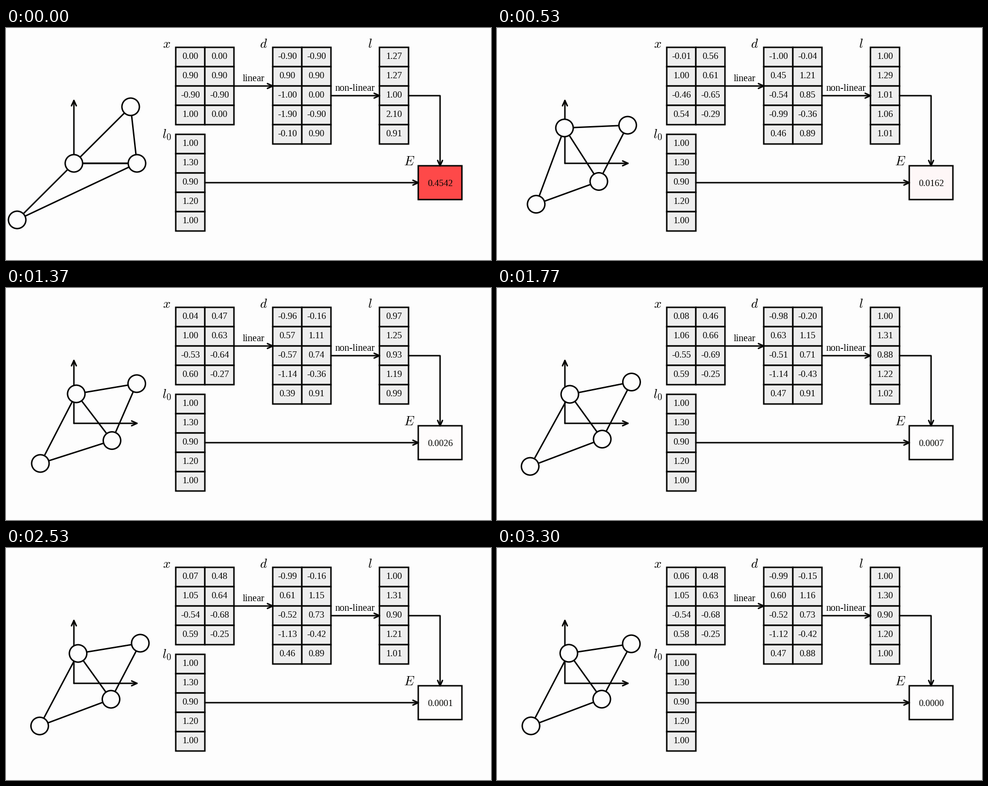
Recreate the animation shown at these times as a matplotlib script. Size 1000 by 480 pixels, loop 3330 ms.

```python
from itertools import product

import matplotlib.pyplot as plt
import numpy as np
from matplotlib.animation import FuncAnimation
from matplotlib.patches import Circle, Rectangle

STEPS, LOOP_MS = 100, 3330
FRAMES = 2 * STEPS  # two frames per step
PAPER, INK, CELL = "#fdfdfd", "#040402", "#eeeeee"
PX = 0.72  # points per pixel at 100 dpi
LINE = dict(color=INK, lw=3 * PX, solid_capstyle="round",
            solid_joinstyle="round", snap=False)

# Spring network: d = LINKS @ x, l = |d|, E = sum((l - REST)^2) / 2
PAIRS = [(0, 1), (0, 2), (0, 3), (2, 3), (1, 3)]
LINKS = np.array([np.eye(4)[a] - np.eye(4)[b] for a, b in PAIRS])
REST = np.array([1.0, 1.3, 0.9, 1.2, 1.0])
START = np.array([[0, 0], [0.9, 0.9], [-0.9, -0.9], [1, 0]])

# Two poses the descent passes through, by step
WAYPOINTS = {
    16: [(-0.01, 0.56), (1.00, 0.61), (-0.46, -0.65), (0.54, -0.29)],
    41: [(0.04, 0.47), (1.00, 0.63), (-0.53, -0.64), (0.60, -0.27)],
}


def measure(x):
    d = LINKS @ x
    return d, np.linalg.norm(d, axis=-1)


def descend(rate, b1, b2, unbias):
    """Adam on E for a whole batch of settings; returns every step."""
    x = START + 0 * rate
    m, v, path = 0, 0, [x]
    for t in range(1, STEPS):
        d, l = measure(x)
        g = LINKS.T @ ((1 - REST / l)[..., None] * d)
        m = b1 * m + (1 - b1) * g
        v = b2 * v + (1 - b2) * g * g
        m_hat = m / (1 - unbias * b1**t)
        v_hat = v / (1 - unbias * b2**t)
        x = x - rate * m_hat / (np.sqrt(v_hat) + 1e-8)
        path.append(x)
    return np.array(path)


def solve():
    """Return the descent whose settings pass closest to the waypoints."""
    grid = product(np.arange(0.005, 0.3, 0.005), (0.8, 0.85, 0.9, 0.95),
                   (0.9, 0.95, 0.99, 0.999), (1, 0))
    paths = descend(*np.array(list(grid)).T[..., None, None])
    goal = np.array(list(WAYPOINTS.values()))[:, None]
    error = paths[list(WAYPOINTS)] - goal
    return paths[:, np.nanargmin((error**2).sum(axis=(0, 2, 3)))]


path = solve()

plt.rcParams["font.family"] = "Liberation Serif"
plt.rcParams["mathtext.fontset"] = "cm"
fig = plt.figure(figsize=(10, 4.8), dpi=100, facecolor=PAPER)
ax = fig.add_axes([0, 0, 1, 1])
ax.set(xlim=(0, 1000), ylim=(480, 0))
ax.axis("off")


def write(x, y, text, size):
    return ax.text(x, y, text, size=size * PX, color=INK, ha="center",
                   va="baseline", zorder=6)


def box(x, y, w, h, fill):
    return ax.add_patch(Rectangle((x, y), w, h, fc=fill, ec=INK, lw=3 * PX,
                                  joinstyle="miter", snap=False, zorder=2))


def table(x, y, rows, cols):
    cells = []
    for r, c in np.ndindex(rows, cols):
        box(x + 60 * c, y + 40 * r, 60, 40, CELL)
        cells.append(write(x + 60 * c + 30, y + 40 * r + 24, "", 19.2))
    return cells


def fill_in(cells, values):
    for cell, value in zip(cells, np.ravel(values)):
        cell.set_text(f"{value:.2f}")


def arrow(*points):
    p = np.array(points, float)
    ax.plot(*p.T, zorder=3, **LINE)
    along = (p[-1] - p[-2]) / np.linalg.norm(p[-1] - p[-2])
    side = along[::-1] * 5
    back = p[-1] - 11 * along
    ax.plot(*np.array([back + side, p[-1], back - side]).T, zorder=3, **LINE)


x_cells = table(350, 40, 4, 2)
d_cells = table(550, 40, 5, 2)
l_cells = table(770, 40, 5, 1)
fill_in(table(350, 220, 5, 1), REST)
energy_box = box(850, 285, 90, 70, PAPER)
energy_text = write(895, 327, "", 19.2)

for x, y, name in [(331, 41, "x"), (531, 41, "d"), (751, 41, "l"),
                   (331, 227, "l_0"), (831, 284, "E")]:
    write(x, y, f"${name}$", 27)
write(510, 110, "linear", 20)
write(720, 130, "non-linear", 20)

arrow((470, 120), (550, 120))
arrow((670, 140), (770, 140))
arrow((830, 140), (895, 140), (895, 285))
arrow((410, 320), (850, 320))
arrow((140, 280), (270, 280))
arrow((140, 280), (140, 150))

springs = [ax.plot([], [], zorder=4, **LINE)[0] for _ in PAIRS]
nodes = [ax.add_patch(Circle((0, 0), 18, fc=PAPER, ec=INK, lw=3 * PX, zorder=5))
         for _ in range(4)]


def draw(frame):
    x = path[min((frame + 1) // 2, STEPS - 1)]
    d, l = measure(x)
    energy = ((l - REST) ** 2).sum() / 2
    fill_in(x_cells, x)
    fill_in(d_cells, d)
    fill_in(l_cells, l)
    energy_text.set_text(f"{energy:.4f}")
    pale = np.clip(0.992 - 1.55 * energy, 0, 1)
    energy_box.set_facecolor((0.995, pale, pale))

    spots = [140, 280] + x * [130, -130]
    for spring, pair in zip(springs, PAIRS):
        spring.set_data(*spots[list(pair)].T)
    for node, spot in zip(nodes, spots):
        node.center = tuple(spot)
    return []


anim = FuncAnimation(fig, draw, frames=FRAMES, interval=LOOP_MS / FRAMES,
                     init_func=lambda: draw(0), repeat=True, repeat_delay=0)
plt.show()
```
